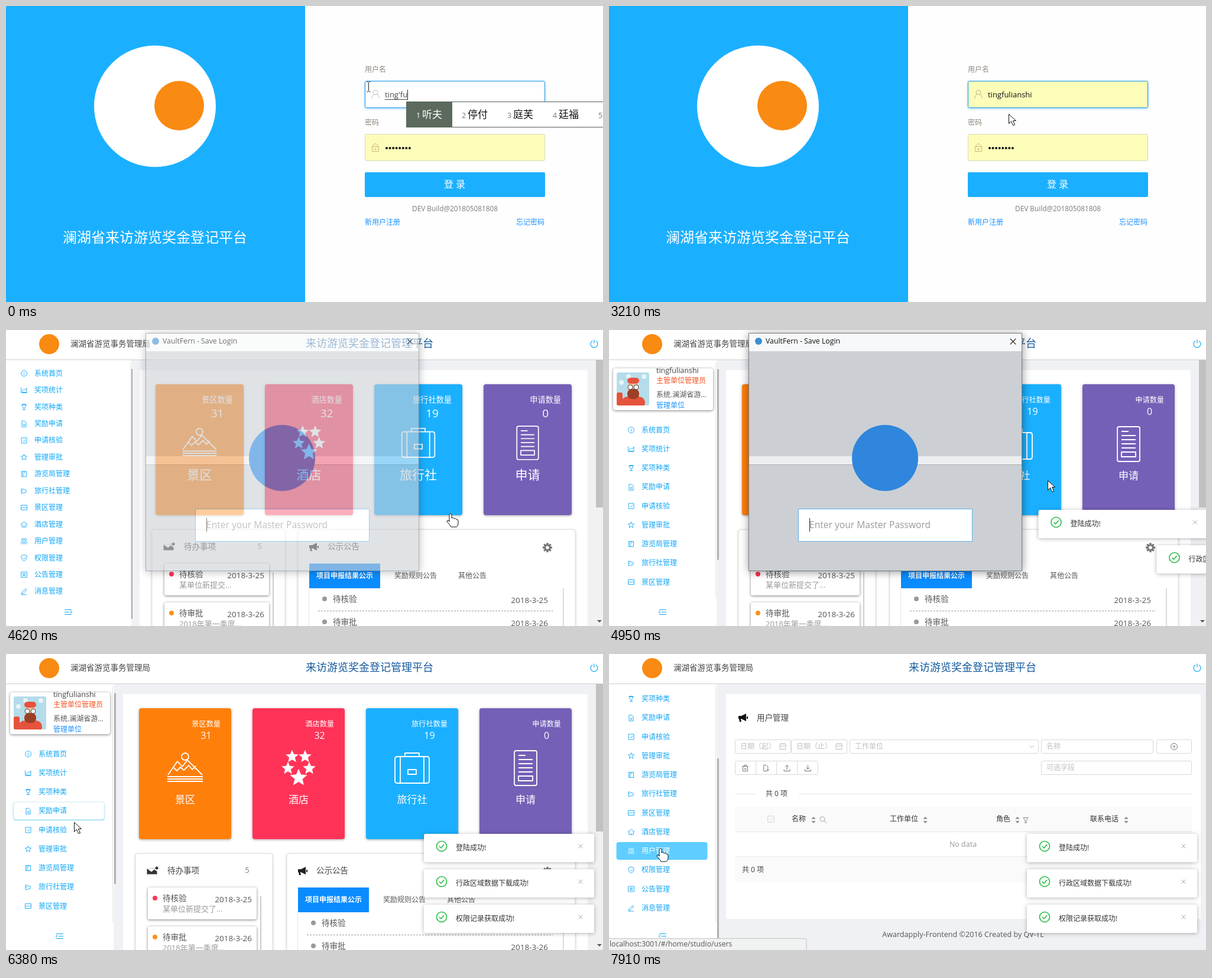
Recreate the animation shown at these times as an HTML page with a canvas. Size 1010 by 502 pixels, loop 8 s.

```html
<!DOCTYPE html>
<html lang="zh">
<head>
<meta charset="utf-8">
<style>
html, body { margin: 0; width: 100%; height: 100%; overflow: hidden; background: #fff; }
canvas { display: block; }
</style>
</head>
<body>
<canvas id="stage" width="1010" height="502"></canvas>
<script>
const g = document.getElementById('stage').getContext('2d', { willReadFrequently: true });
const FONT = '"Open Sans", "Noto Sans CJK SC", "Noto Sans CJK JP", sans-serif';
const BLUE = '#1bb0ff', LINK = '#0fa6f6', ORANGE = '#ff7f0b', RED = '#ff3357', PURPLE = '#7460b7';
const USER = 'tingfulianshi', LOOP = 8000;

const spread = (from, to, n) => Array.from({ length: n }, (_, i) => from + (to - from) * i / (n - 1));
const STEPS = [0, ...spread(220, 560, 4), 990, 1090, 1540, 2090, ...spread(2520, 2960, 5), 3210,
  ...spread(3630, 4400, 8), 4520, 4620, ...spread(4730, 5270, 6), ...spread(5390, 5820, 5),
  ...spread(5930, 6160, 3), ...spread(6260, 6940, 7), 7040, ...spread(7160, 7700, 6), 7910];

const clamp = v => Math.max(0, Math.min(1, v));
const ease = v => { v = clamp(v); return v * v * (3 - 2 * v); };

function text(s, x, y, size, color, align = 'left', weight = 400) {
  g.font = `${weight} ${size}px ${FONT}`;
  g.textAlign = align;
  g.textBaseline = 'middle';
  g.fillStyle = color;
  g.fillText(s, x, y + 1);
}
function rect(x, y, w, h, color) {
  g.fillStyle = color;
  g.fillRect(x, y, w, h);
}
function box(x, y, w, h, r, fill, stroke, shadow, blur = 4) {
  g.save();
  g.beginPath();
  g.roundRect(x, y, w, h, r);
  if (shadow) { g.shadowColor = shadow; g.shadowBlur = blur; g.shadowOffsetY = 1; }
  if (fill) { g.fillStyle = fill; g.fill(); }
  g.shadowColor = 'transparent';
  if (stroke) { g.lineWidth = 1; g.strokeStyle = stroke; g.stroke(); }
  g.restore();
}
function disc(x, y, r, color) {
  g.beginPath();
  g.arc(x, y, r, 0, 7);
  g.fillStyle = color;
  g.fill();
}
function path(d, x, y, { stroke, fill, width = 1, scale = 1, dash = [] }) {
  const p = new Path2D(d);
  g.save();
  g.translate(x, y);
  g.scale(scale, scale);
  g.setLineDash(dash);
  g.lineWidth = width;
  g.lineJoin = 'round';
  if (fill) { g.fillStyle = fill; g.fill(p); }
  if (stroke) { g.strokeStyle = stroke; g.stroke(p); }
  g.restore();
}
const ring = (x, y, r) => `M${x - r} ${y}a${r} ${r} 0 1 0 ${2 * r} 0a${r} ${r} 0 1 0 ${-2 * r} 0`;
const frame = (w, h) => `M${-w / 2} ${-h / 2}h${w}v${h}h${-w}z`;
const star = (x, y, r) => 'M' + Array.from({ length: 10 }, (_, i) => {
  const a = Math.PI * (i / 5 - 0.5), k = i % 2 ? r * 0.45 : r;
  return `${x + k * Math.cos(a)} ${y + k * Math.sin(a)}`;
}).join('L') + 'z';

const MENU = [
  ['系统首页', ring(0, 0, 5.5) + 'M0-3v1M0-1v4'],
  ['奖项统计', 'M-5.5-5v10h11M-3 4v-3l3-3 2 2 3-4v8z'],
  ['奖项种类', 'M-3-5h6v4q-3 6-6 0zM-5-4h10M0 2v3M-3 5h6'],
  ['奖励申请', 'M-4-5h5l3 3v8h-8zM-2 1h4M-2 3h4'],
  ['申请核验', frame(10, 10) + 'M-2 0l2 2 3-4'],
  ['管理审批', star(0, 0, 6)],
  ['游览局管理', frame(9, 10) + 'M-2-5v10M1-5v4'],
  ['旅行社管理', 'M-5-4l9 3v4l-9 2zM-5 0h3'],
  ['景区管理', frame(11, 9) + 'M-5 2l3-3 3 2 2-2 2 2'],
  ['酒店管理', 'M-6 0l6-5 6 5M-4-1v6h8v-6M0 5v-3'],
  ['用户管理', ring(-2.5, -3, 2) + ring(2.5, -3, 2) + ring(-3, 3, 2.4) + ring(3, 3, 2.4)],
  ['权限管理', 'M0-6l5 2v4q-1 4-5 6q-4-2-5-6v-4zM-2 0l2 2 3-3'],
  ['公告管理', frame(11, 10) + 'M-3-2h6M-3 0h6M-3 2h6'],
  ['消息管理', 'M-4 2l7-7 2 2-7 7-3 1zM-5 6h10']
];
const CROSS = 'M-4-4l8 8M4-4l-8 8';
const MEGAPHONE = 'M-8-3h5l8-4v13l-8-4h-1l1 5h-3l-1-5h-1zM6-2h2v4h-2z';

// ---- pointer ----
const POINTER = [
  [0, 613, 136, 'beam'], [2420, 613, 136, 'beam'], [2620, 625, 149, 'arrow'], [2960, 676, 183, 'arrow'],
  [3500, 676, 183, 'arrow'], [4000, 754, 312, 'hand'], [4730, 754, 312, 'arrow'], [5500, 691, 13, 'arrow'],
  [5700, 691, 13, 'beam'], [5850, 691, 13, 'arrow'], [6160, 260, 150, 'arrow'], [6400, 110, 290, 'arrow'],
  [6700, 119, 355, 'arrow'], [7050, 119, 355, 'arrow'], [7380, 89, 330, 'hand'], [LOOP, 89, 330, 'hand']
];
function pointerAt(t) {
  const i = POINTER.findIndex((k, n) => n && k[0] > t);
  const [t0, x0, y0, kind] = POINTER[i - 1], [t1, x1, y1] = POINTER[i];
  const p = ease((t - t0) / (t1 - t0));
  return { x: Math.round(x0 + (x1 - x0) * p), y: Math.round(y0 + (y1 - y0) * p), kind };
}
function drawPointer({ x, y, kind }) {
  const look = { fill: '#fff', stroke: '#111' };
  if (kind === 'beam') {
    path('M-3-8h2l1 1 1-1h2M0-7v15M-3 9h2l1-1 1 1h2', x + 0.5, y + 0.5, { stroke: '#222' });
  } else if (kind === 'arrow') {
    path('M0 0v16l4-4 3 7 3-1-3-7h5z', x + 0.5, y + 0.5, look);
  } else {
    path('M-2 1q2-3 4 0v6q3-2 4 1q3-1 4 1q3 0 3 3v4q0 4-3 6h-9q-2-4-7-9q0-3 3-2l1 2z', x - 2, y, look);
  }
}

// ---- sign-in page ----
const COMPOSE = [[0, "ting'fu"], [220, "ting'fu'l"], [333, "ting'fu'li"], [446, "ting'fu'lia"],
  [560, "ting'fu'lian"], [990, "ting'fu'lian'sh"], [1090, "ting'fu'lian'shi"]];

function inputMethod(t) {
  const typed = COMPOSE.filter(k => k[0] <= t + 1).pop()[1];
  text(typed, 641, 151, 13, '#444');
  const end = 641 + Math.min(g.measureText(typed).width, 200);
  rect(641, 158, end - 641, 1, '#444');
  rect(Math.round(end), 142, 1, 17, '#222');
  const early = t < 220, late = t >= 990;
  const words = early ? ['听夫', '停付', '庭芙', '廷福', '亭'] : late ? ['庭芙莲市', '庭芙莲', '庭芙', '停付']
    : ['庭芙莲', '听夫', '停付', '庭芙', '廷福', '亭'];
  const left = early ? 677 : 629, right = late ? 971 : 1012;
  box(left + 0.5, 162.5, right - left, 43, 0, '#fff', '#566056');
  let x = left;
  words.forEach((word, i) => {
    const w = 43 + word.length * 17;
    if (!i) rect(x, 163, w + 1, 43, '#5b6a5d');
    text(i + 1, x + 17, 186, 12.5, i ? '#777' : '#fff');
    text(word, x + 27, 185, 17, i ? '#111' : '#fff');
    x += w;
  });
}
function field(y, yellow, focus) {
  box(607.5, y + 0.5, 304, 45, 2, yellow ? '#fcfdb9' : '#fff', focus ? '#1d9cec' : '#d9d9c0',
    focus && 'rgba(24,144,255,.6)', 4);
}
function loginPage(t, pointer) {
  rect(0, 0, 1010, 502, '#fefefe');
  rect(0, 0, 506, 502, BLUE);
  disc(252, 170, 103, '#fff');
  disc(293, 169, 42, '#f98a12');
  text('澜湖省来访游览奖金登记平台', 96, 394, 24, '#fff');
  text('用户名', 607, 108, 12, '#8d877c');
  text('密码', 607, 198, 12, '#8d877c');

  const listOpen = t >= 1540 && t < 3210;
  const picked = t >= 3210 || (listOpen && pointer.y > 174);
  field(127, picked, true);
  field(217, true);
  path(ring(0, -3, 4) + 'M-6 7q0-6 4-7M6 7q0-6-4-7', 625, 149.5, { stroke: picked ? '#b9b583' : '#c4bfb8' });
  path('M-5.5-2h11v8h-11zM-4-2v-2q4-6 8 0v2M0 1v3M-2 2h4', 625, 240.5, { stroke: '#cdb96f' });
  for (let i = 0; i < 8; i++) disc(644 + i * 5.55, 241, 2, '#111');

  if (t < 1540) inputMethod(t);
  else text(USER, 641, 151, 13, picked ? '#111' : '#666');
  if ((t >= 1540 && t < 2090) || (t >= 2520 && t < 2700)) rect(723, 142, 1, 17, '#222');
  if (listOpen) {
    box(607.5, 174.5, 306, 25, 0, picked ? '#e2e2e2' : '#fff', '#111');
    text(USER, 616, 187, 12, '#111', 'left', 700);
  }
  const over = pointer.kind === 'hand';
  box(607, 282, 305, 42, 2, over ? '#40bcff' : BLUE);
  text('登 录', 759, 303, 16, '#fff', 'center');
  text('DEV Build@201805081808', 759.5, 344, 11.8, '#7b7b7b', 'center');
  text('新用户注册', 607, 367, 12, '#1890ff');
  text('忘记密码', 911, 367, 12, '#1890ff', 'right');
}

// ---- shared page frame ----
function header() {
  rect(0, 0, 1010, 50, '#fff');
  rect(0, 50, 1010, 1, '#cfcfcf');
  disc(73, 24, 17, '#f98a12');
  text('澜湖省游览事务管理局', 109, 23, 13.5, '#444');
  text('来访游览奖金登记管理平台', 507, 23, 18, '#135a9e');
  path('M-3-5a6 6 0 1 0 6 0M0-7v6', 995, 23.5, { stroke: LINK, width: 1.2 });
}
function userCard(dy) {
  box(7, 65 - dy, 169, 71, 4, '#fff', null, 'rgba(0,0,0,.5)', 4);
  g.save();
  g.translate(13, 72 - dy);
  box(0, 0, 55, 56, 3, '#b5dcea');
  g.clip();
  [8, 20, 33, 46].forEach((x, i) => disc(x, i % 2 ? 7 : 17, 4, '#e8f4f6'));
  box(8, 41, 40, 20, 10, '#e6533c');
  box(19, 14, 18, 28, 9, '#f3c3a0');
  box(18, 28, 20, 17, 8, '#9c3f24');
  box(18, 9, 20, 10, 5, '#e6533c');
  path(ring(-5, 0, 4) + ring(5, 0, 4), 28, 25, { stroke: '#444', fill: '#fff' });
  box(0, 34, 10, 23, 3, '#e6533c');
  g.restore();
  text(USER, 80, 69 - dy, 12.5, '#444');
  text('主管单位管理员', 80, 86 - dy, 12, '#f4511e');
  text('系统.澜湖省游...', 80, 110 - dy, 12, '#555');
  text('管理单位', 80, 128 - dy, 12, '#1890ff');
}
function sidebar(early, scroll, hover, active) {
  const width = early ? 212 : 182, x = early ? 48 : 55;
  const base = early ? 73.5 : 169.5 - scroll, pitch = early ? 28.45 : 32.25;
  rect(0, 51, width, 451, '#fff');
  rect(width - 2, 55, 1, 400, '#e3e3e3');
  if (early) rect(212, 66, 2, 424, '#a8a8a8');
  else box(183, 66 + scroll * 0.7, 3, 324, 1.5, '#b0b0b0');
  g.save();
  g.beginPath();
  g.rect(0, 51, width - 1, 400);
  g.clip();
  if (!early) userCard(scroll);
  MENU.forEach(([name, icon], i) => {
    const y = base + i * pitch, on = i === active;
    if (on) box(12.5, y - 15, 154, 30, 4, '#5fcdff');
    else if (i === hover) box(13, y - 15, 153, 29, 4, '#fff', '#e2f4fb', 'rgba(0,170,220,.8)', 3);
    const color = on ? '#fff' : LINK;
    path(icon, x - 17.5, y, { stroke: color, scale: 0.9 });
    text(name, x, y, 12, color);
  });
  g.restore();
  const fold = early ? 'M-6-4h12M-6 0h8M-6 4h12M4-2l3 2-3 2' : 'M-6-4h12M-2 0h8M-6 4h12M-4-2l-3 2 3 2';
  path(fold, early ? 105 : 91, 478.5, { stroke: LINK });
}

// ---- dashboard ----
const WIDE = { main: 226, card: 253, gap: 185, w: 149, label: 13.2, num: 19, numY: 142, name: 21, nameY: 247,
  icon: 0.96, iconY: 190, todo: 247, todoW: 225, news: 494, note: '某单位新提交...' };
const NARROW = { main: 198, card: 225, gap: 192, w: 156, label: 12.2, num: 16, numY: 139, name: 17, nameY: 248,
  icon: 1, iconY: 192, todo: 219, todoW: 232, news: 475, note: '某单位新提交了...' };
const STATS = [
  ['景区', 31, ORANGE, ring(0, -18, 6) + 'M-29 13l16-23 8 9 9-11 25 25M-20 0l6 6 6-6 6 5 8-8 6 7 6-6M-30 16h60M-30 20h60M-30 24h60'],
  ['酒店', 32, RED, star(-11, -18, 11) + star(11, -18, 11) + star(-18, 2, 11) + star(18, 2, 11) + star(0, 18, 15)],
  ['旅行社', 19, BLUE, 'M-25-18h50q4 0 4 4v37q0 4-4 4h-50q-4 0-4-4v-37q0-4 4-4zM-12-18v-6h24v6M-20-18v45M20-18v45M-7 4h14v8h-14z'],
  ['申请', 0, PURPLE, 'M-16-28h32q3 0 3 3v53q0 3-3 3h-32q-3 0-3-3v-53q0-3 3-3zM-12-20h12M-12-13h24M-12-6h24M-12 1h24M-12 8h24M-12 15h24v8h-24z']
];
function statCard([name, value, color, icon], x, L) {
  const label = name + '数量', mid = x + L.w / 2;
  box(x, 92, L.w, 222, 4, color, null, 'rgba(0,0,0,.35)', 4);
  text(label, x + L.w - 18, 119, L.label, '#fff', 'right');
  text(value, x + L.w - 18 - label.length * L.label / 2, L.numY, L.num, '#fff', 'center');
  path(icon, mid, L.iconY, { stroke: '#fff', fill: name === '酒店' && '#fff', width: name === '酒店' ? 0.3 : 1.8, scale: L.icon });
  text(name, mid, L.nameY, L.name, '#fff', 'center');
}
function todoPanel(L) {
  const x = L.todo, right = x + L.todoW;
  box(x, 338.5, L.todoW, 180, 4, '#fff', '#e0e0e0', 'rgba(0,0,0,.25)', 4);
  path('M-9-5h14v3l4 2v6h-18zM-9-5l8 6 6-5', x + 28, 368, { fill: '#333', stroke: '#fff' });
  disc(x + 36, 363, 2.5, '#333');
  text('待办事项', x + 54, 367, 13.5, '#444');
  text(5, right - 43, 367, 13, '#777', 'center');
  rect(right - 21, 411, 2, 91, '#ccc');
  [['待核验', '2018-3-25', RED, L.note], ['待审批', '2018-3-26', '#f7931e', '2018年第一季度...']].forEach(([kind, date, dot, note], i) => {
    const y = 396 + i * 66;
    box(x + 21, y, L.todoW - 48, 54, 3, '#fff', null, 'rgba(0,0,0,.5)', 4);
    disc(x + 33, y + 18, 4, dot);
    text(kind, x + 46, y + 18, 13.5, '#555');
    text(date, right - 35, y + 20, 13.5, '#555', 'right');
    text(note, x + 46, y + 37, 13, '#999');
  });
}
function newsPanel(L) {
  const x = L.news;
  box(x, 338.5, 963 - x, 180, 4, '#fff', '#e0e0e0', 'rgba(0,0,0,.25)', 4);
  path(MEGAPHONE, x + 27, 368, { fill: '#222' });
  text('公示公告', x + 50, 367, 13.5, '#444');
  for (let i = 0; i < 8; i++) {
    g.save();
    g.translate(916, 369);
    g.rotate(i * Math.PI / 4);
    rect(-1.7, -8, 3.4, 4, '#777');
    g.restore();
  }
  path(ring(0, 0, 4.3), 916, 369, { stroke: '#777', width: 3 });
  rect(x + 19, 396, 120, 42, '#0a8cff');
  text('项目申报结果公示', x + 79, 417, 12, '#fff', 'center', 700);
  text('奖励规则公告', x + 163, 417, 12, '#555');
  text('其他公告', x + 271, 417, 12, '#555');
  rect(x + 18, 438, 1, 64, '#e5e5e5');
  rect(942, 438, 2, 64, '#ddd');
  path(`M0 0H${891 - x}`, x + 34, 476.5, { stroke: '#999', dash: [3, 2] });
  [['待核验', '2018-3-25'], ['待审批', '2018-3-26']].forEach(([kind, date], i) => {
    disc(x + 45, 456 + i * 39, 4, '#999');
    text(kind, x + 59, 456 + i * 39, 13.5, '#555');
    text(date, 917, 458 + i * 39, 13.5, '#555', 'right');
  });
}
function dashboard(L) {
  rect(L.main, 68, 984 - L.main, 434, '#fff');
  STATS.forEach((stat, i) => statCard(stat, L.card + i * L.gap, L));
  todoPanel(L);
  newsPanel(L);
  rect(998, 51, 12, 451, '#f1f1f1');
  rect(998, 51, 12, 250, '#c1c1c1');
  path('M-4-2h8l-4 4z', 1004, 494, { fill: '#555' });
}

// ---- user list ----
function sorter(x) {
  path('M-4-2l4-4 4 4zM-4 2l4 4 4-4z', x, 281.5, { fill: '#888', scale: 0.9 });
}
function usersPage() {
  const line = '#d9d9d9', hint = '#bfbfbf', gray = { stroke: '#777' };
  const input = (x, y, w, label = '') => {
    box(x + 0.5, y + 0.5, w - 1, 23, 2, '#fff', line);
    text(label, x + 9, y + 12, 12, hint);
  };
  rect(198, 68, 803, 381, '#fff');
  path(MEGAPHONE, 227, 108, { fill: '#111' });
  text('用户管理', 250, 108, 13.5, '#444');
  input(213, 145, 95, '日期（起）');
  input(308, 145, 95, '日期（止）');
  [294, 389].forEach(x => path(frame(10, 9) + 'M-5-1h10M-2-6v2M2-6v2', x, 157, { stroke: hint }));
  input(407, 145, 320, '工作单位');
  path('M-4-2l4 4 4-4', 715, 157, { stroke: hint });
  input(731, 145, 190, '名称');
  input(926, 145, 60);
  path(ring(0, 0, 5.5) + 'M-2-2l4 4M2-2l-4 4', 956, 157, gray);
  input(731, 181, 255, '可选字段');
  input(213, 181, 141);
  ['M-5-3h10M-4-3v8h8v-8M-2-3v-2h4v2M-1 0v3M1 0v3', 'M2 5h-6v-10h4l3 3v3M3 1v4M1 3h4',
    'M-5 2v3h10v-3M0 3v-8M-3-2l3-3 3 3', 'M-5 2v3h10v-3M0 2v-7M-3-1l3 3 3-3'].forEach((icon, i) => {
    if (i) rect(213 + i * 35, 181, 1, 24, line);
    path(icon, 230.5 + i * 35.3, 193.5, gray);
  });
  rect(213, 237, 34, 1, '#e8e8e8');
  rect(321, 237, 665, 1, '#e8e8e8');
  text('共 0 项', 265, 237, 12, '#444');
  rect(213, 259, 773, 42, '#fafafa');
  box(268.5, 274.5, 11, 11, 1, '#f5f5f5', line);
  [['名称', 309, 346], ['工作单位', 475, 535], ['角色', 655, 691], ['联系电话', 814, 875]].forEach(([name, x, sx]) => {
    text(name, x, 280, 12, '#333');
    sorter(sx);
  });
  path(ring(-1, -1, 4) + 'M2 2l4 4', 362, 281, { stroke: '#aaa' });
  path('M-4-4h8l-3 5v4h-2v-4z', 705, 281.5, { stroke: '#888' });
  rect(213, 301, 773, 1, '#e8e8e8');
  text('No data', 599, 323, 12.5, '#999', 'center');
  rect(213, 343, 773, 1, '#e8e8e8');
  rect(213, 344, 773, 43, '#fafafa');
  text('共 0 项', 225, 366, 12, '#444');
  text('Awardapply-Frontend ©2016 Created by QV-TL', 599, 476, 12.6, '#555', 'center');
}

// ---- overlays ----
function saveDialog(alpha, scale, closing) {
  // Blend by pixels so the fade applies to the whole window at once.
  const page = g.getImageData(0, 0, 1010, 502);
  g.save();
  g.translate(467.5, 206.5);
  g.scale(scale, scale);
  g.translate(-467.5, -206.5);
  box(236.5, 5.5, 462, 403, 0, '#ccd0d5', '#777b80', 'rgba(0,0,0,.45)', 14);
  rect(237, 6, 461, 30, '#f7f8f9');
  if (closing) rect(667, 5, 31, 30, '#e81123');
  disc(253, 19, 6, '#3d8fd0');
  text('VaultFern - Save Login', 265, 19, 12.3, '#111');
  path(CROSS, 683.5, 19.5, { stroke: closing ? '#fff' : '#111', scale: 1.2 });
  rect(237, 214, 461, 14, '#eceef0');
  rect(237, 228, 461, 1, '#aaa');
  disc(467, 217, 56, '#2f86dc');
  box(320.5, 303.5, 294, 55, 0, '#fff', '#5fb0e8');
  text('Enter your Master Password', 339, 331, 15.6, '#999');
  rect(339, 319, 1, 23, '#222');
  g.restore();
  if (alpha < 1) {
    const shown = g.getImageData(0, 0, 1010, 502);
    for (let i = 0; i < shown.data.length; i++) {
      shown.data[i] = page.data[i] + (shown.data[i] - page.data[i]) * alpha;
    }
    g.putImageData(shown, 0, 0);
  }
}
function notices(t) {
  ['登陆成功!', '行政区域数据下载成功!', '权限记录获取成功!'].forEach((message, i) => {
    const p = ease((t - 4760 - i * 110) / 220), y = 305 + i * 60;
    if (!p) return;
    g.save();
    g.translate((1 - p) * 303, 0);
    box(707, y, 288, 48, 3, '#fff', null, 'rgba(0,0,0,.3)', 7);
    path(ring(0, 0, 8.5) + 'M-4 0l3 3 5-6', 737, y + 21, { stroke: '#28bd45', width: 1.6 });
    text(message, 761, y + 24, 12, '#333');
    path(CROSS, 972, y + 21, { stroke: '#999', scale: 0.85 });
    g.restore();
  });
}
function statusBar() {
  box(-2, 482.5, 336, 24, 3, '#f1f2f2', '#c2c2c2');
  text('localhost:3001/#/home/studio/users', 1, 492, 12.2, '#555');
}

function consolePage(t, pointer) {
  const early = t < 4800;
  const scroll = 158 * ease((t - 6420) / 440);
  const inMenu = t > 6200 && pointer.x < 175;
  const hover = inMenu ? Math.floor((pointer.y - 169.5 + scroll + 8) / 32.25) : -1;
  rect(0, 0, 1010, 502, '#eff1f4');
  if (t >= 7910) usersPage();
  else dashboard(early ? WIDE : NARROW);
  sidebar(early, scroll, hover, t >= 7480 ? 10 : -1);
  header();
  if (t >= 4620 && t < 5930) {
    const fading = t >= 5820;
    saveDialog(t < 4730 ? 0.6 : fading ? 0.3 : 1, fading ? 0.985 : 1, t >= 5500);
  }
  notices(t);
  if (hover === 10) statusBar();
}

function draw(now) {
  const clock = now % LOOP;
  const t = STEPS.filter(s => s <= clock).pop();
  const pointer = pointerAt(t);
  if (t < 4520) loginPage(t, pointer);
  else consolePage(t, pointer);
  drawPointer(pointer);
}
let start;
function tick(now) {
  start ??= now;
  draw(now - start);
  requestAnimationFrame(tick);
}
requestAnimationFrame(tick);
</script>
</body>
</html>
```
